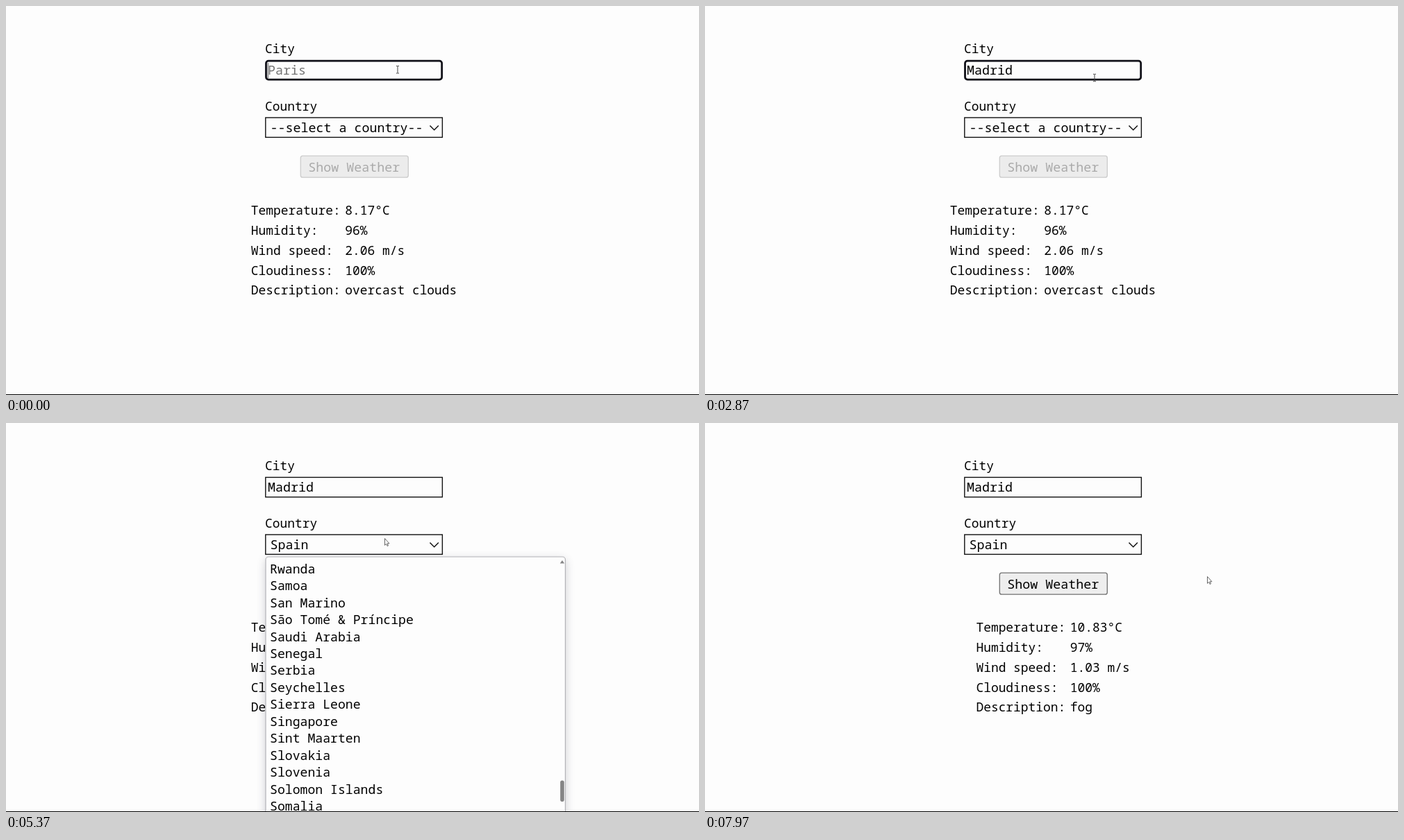
An HTML page for the animation above (8000 ms loop, 998 px wide and 561 px high).

```html
<!DOCTYPE html>
<html lang="en">
<head>
<meta charset="utf-8">
<title>Weather form</title>
<style>
  html, body { margin: 0; width: 100%; height: 100%; overflow: hidden; background: #fdfdfd; }
  svg { display: block; width: 998px; height: 561px; }
  text { font-family: "Noto Sans Mono", "DejaVu Sans Mono", monospace; font-size: 17.92px; fill: #000; white-space: pre; }
  .field { font-size: 18.35px; }
  .option { font-size: 18.15px; }
</style>
</head>
<body>
<svg id="stage" viewBox="0 0 998 561">
  <defs>
    <filter id="shadow" x="-10%" y="-10%" width="120%" height="120%">
      <feGaussianBlur stdDeviation="7"/>
    </filter>
    <clipPath id="outside"><path clip-rule="evenodd" d="M330 180H850V561H330ZM374 193H805.5V561H374Z"/></clipPath>
    <clipPath id="inside"><rect x="375" y="194" width="430" height="367"/></clipPath>
  </defs>
</svg>
<script>
const LOOP = 8000;
const T = {
  open: 3370, filled: 3440, typeS: 4220, typeP: 4640, close: 5620,
  blur: 7120, result: 7350
};
const KEYS = [1700, 1790, 1870, 2030, 2130, 2250];
const CITY = "Madrid";
const FIRST = ["--select a country--", "Afghanistan", "Åland Islands", "Albania", "Algeria",
  "American Samoa", "Andorra", "Angola", "Anguilla", "Antigua & Barbuda", "Argentina",
  "Armenia", "Aruba", "Australia", "Austria"];
const LATER = ["Pakistan", "Palau", "Palestinian Authority", "Panama", "Papua New Guinea",
  "Paraguay", "Peru", "Philippines", "Pitcairn Islands", "Poland", "Portugal", "Puerto Rico",
  "Qatar", "Réunion", "Romania", "Russia", "Rwanda", "Samoa", "San Marino",
  "São Tomé & Príncipe", "Saudi Arabia", "Senegal", "Serbia", "Seychelles", "Sierra Leone",
  "Singapore", "Sint Maarten", "Slovakia", "Slovenia", "Solomon Islands", "Somalia"];
const LABELS = ["Temperature:", "Humidity:", "Wind speed:", "Cloudiness:", "Description:"];
const BEFORE = ["8.17°C", "96%", "2.06 m/s", "100%", "overcast clouds"];
const AFTER = ["10.83°C", "97%", "1.03 m/s", "100%", "fog"];
// pointer stops: time, x, y
const PATH = [[0, 564, 92], [2750, 564, 92], [3230, 545, 166], [6130, 545, 166],
  [6480, 591, 162], [6680, 591, 162], [7020, 530, 229], [7420, 530, 229], [7900, 723, 221]];

const stage = document.getElementById("stage");

function set(el, attrs) {
  for (const k in attrs) el.setAttribute(k, attrs[k]);
  return el;
}
function add(name, attrs, parent = stage) {
  const el = document.createElementNS("http://www.w3.org/2000/svg", name);
  return parent.appendChild(set(el, attrs));
}
function label(x, y, str, cls = "", parent = stage) {
  const el = add("text", { x, y, class: cls }, parent);
  el.textContent = str;
  return el;
}
function show(el, on) {
  el.setAttribute("visibility", on ? "visible" : "hidden");
}
function write(el, str) {
  if (el.textContent !== str) el.textContent = str;
}
function box(y) {
  return add("rect", { y, fill: "none", stroke: "#000" });
}
function focus(el, y, on) {
  const w = on ? 2.8 : 1.4;
  set(el, {
    x: 373.1 + w / 2, y: y + w / 2, width: 256 - w, height: 29.8 - w,
    rx: on ? 3.5 : 0, "stroke-width": w, stroke: on ? "#101018" : "#111"
  });
}

add("rect", { width: 998, height: 561, fill: "#fdfdfd" });

label(373, 68, "City");
const cityBox = box(78);
const city = label(377, 99, "", "field");
const caret = add("rect", { y: 82, width: 1, height: 22, fill: "#555" });

label(373, 151, "Country");
const countryBox = box(160);
const country = label(380.5, 182, "", "field");
add("path", { d: "M610.5 172.5L616.7 178.7L622.9 172.5", fill: "none", stroke: "#111", "stroke-width": 1.5 });

const button = add("rect", { x: 424.3, y: 216.2, width: 155, height: 31, rx: 3, "stroke-width": 1.3 });
const buttonText = label(435.3, 239, "Show Weather", "field");

const table = add("g", {});
const values = LABELS.map((name, i) => {
  const y = 301 + i * 28.85;
  label(0, y, name, "", table);
  return label(135.4, y, "", "", table);
});

const popup = add("g", {});
add("rect", { x: 374, y: 197, width: 431.5, height: 443, rx: 4, fill: "#223", opacity: 0.22,
  filter: "url(#shadow)" }, add("g", { "clip-path": "url(#outside)" }, popup));
const panel = add("rect", { x: 374, y: 193, width: 431.5, height: 450, rx: 4, fill: "#fdfdfd",
  stroke: "#b4b4b8", "stroke-width": 1.2 }, popup);
const list = add("g", { "clip-path": "url(#inside)" }, popup);
const mark = add("rect", { x: 375, y: 198.5, width: 421, height: 24.4, fill: "#cecece" }, list);
const rows = FIRST.map((_, i) => label(380, 216.7 + i * 24.45, "", "option", list));
add("path", { d: "M797.8 202.5L801 198L804.2 202.5Z", fill: "#858585" }, list);
const thumb = add("rect", { x: 798.2, width: 5.6, height: 30.5, rx: 2.8, fill: "#858585" }, list);

add("rect", { y: 560, width: 998, height: 1, fill: "#000" });

const beam = add("path", { d: "M-2 -5.5H-.7L0 -5L.7 -5.5H2M0 -5V4.5M-2 5H-.7L0 4.5L.7 5H2",
  fill: "none", stroke: "#444", "stroke-width": 1 });
const arrow = add("path", { d: "M.5 .5V10.3L2.7 8.3L4.1 11.5L5.5 10.9L4.1 7.8H7Z",
  fill: "#fff", stroke: "#555", "stroke-width": 0.9 });

function pointer(t) {
  let i = PATH.length - 1;
  while (PATH[i][0] > t) i--;
  const a = PATH[i], b = PATH[i + 1] || a;
  const p = b === a ? 0 : (t - a[0]) / (b[0] - a[0]);
  const e = p * p * (3 - 2 * p);
  return [a[1] + (b[1] - a[1]) * e, a[2] + (b[2] - a[2]) * e];
}

function draw(t) {
  const typed = KEYS.filter(k => k <= t).length;
  const typing = t < T.open;
  const chosen = t >= T.close;
  const opened = !typing && !chosen;

  write(city, typed ? CITY.slice(0, typed) : "Paris");
  city.style.fill = typed ? "#000" : "#757575";
  const since = t - (typed ? KEYS[typed - 1] : 0);
  set(caret, { x: 376.8 + typed * 11.01 });
  show(caret, typing && since % 1000 < 500);
  focus(cityBox, 77.7, typing);
  focus(countryBox, 160.3, chosen && t < T.blur);
  write(country, t < T.typeS ? FIRST[0] : t < T.typeP ? "Samoa" : "Spain");

  const [x, y] = pointer(t);
  const hover = chosen && x > 424 && x < 579 && y > 216 && y < 247;
  set(button, {
    fill: hover ? "#e5e5e5" : chosen ? "#eeeeee" : "#ececec",
    stroke: chosen ? "#707070" : "#cbcbcb"
  });
  buttonText.style.fill = chosen ? "#000" : "#aaa";

  const done = t >= T.result;
  set(table, { transform: `translate(${done ? 390.4 : 352.8} 0)` });
  values.forEach((el, i) => write(el, (done ? AFTER : BEFORE)[i]));

  show(popup, opened);
  if (opened) {
    const ready = t >= T.filled;
    set(panel, { "fill-opacity": ready ? 1 : 0 });
    list.style.display = ready ? "" : "none";
    const top = t < T.typeS ? 0 : t < T.typeP ? 181 : 197;
    rows.forEach((el, i) => write(el, top ? LATER[top - 181 + i] : FIRST[i]));
    mark.style.display = top ? "none" : "";
    set(thumb, { y: 207 + top * 1.566 });
  }

  const overText = x > 373 && x < 629 && y > 78 && y < 107;
  show(beam, overText);
  show(arrow, !overText);
  set(overText ? beam : arrow, { transform: `translate(${x} ${y})` });
}

const start = performance.now();
function tick(now) {
  draw(Math.max(0, now - start) % LOOP);
  requestAnimationFrame(tick);
}
draw(0);
requestAnimationFrame(tick);
</script>
</body>
</html>
```
